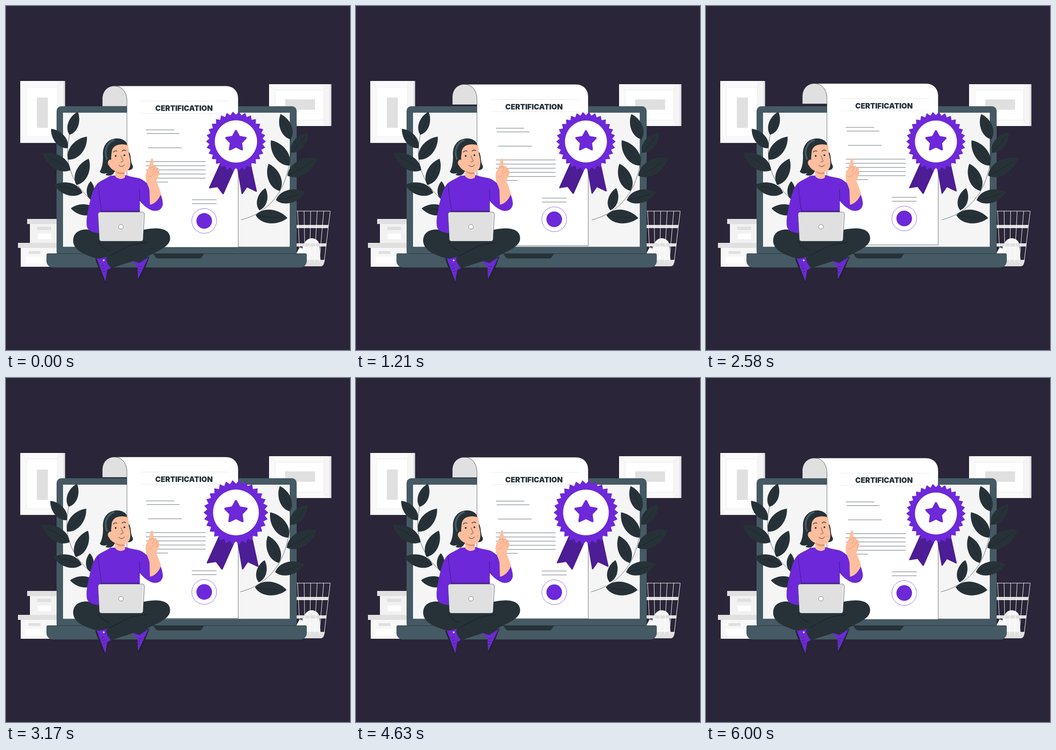
An HTML page with a canvas that plays this animation: 748 px wide and 748 px high, repeating every 6040 ms.

```html
<!DOCTYPE html>
<html lang="en">
<head>
<meta charset="utf-8">
<title>Certification</title>
<style>
html, body { margin: 0; width: 100%; height: 100%; overflow: hidden; background: #2a2538; }
canvas { display: block; width: 748px; height: 748px; }
</style>
</head>
<body>
<canvas id="stage"></canvas>
<script>
const SIZE = 748, LOOP = 6040, BEAT = 1503, LEAD = 12;
const INK = '#263238', STEEL = '#455a64', PURPLE = '#6d28d9', DEEP = '#4c1d95';
const SKIN = '#ffbe9d', GREY = '#e0e0e0', PALE = '#f5f5f5', WHITE = '#ffffff';

const canvas = document.getElementById('stage');
const ctx = canvas.getContext('2d');
const ratio = window.devicePixelRatio || 1;
canvas.width = canvas.height = Math.round(SIZE * ratio);

function fill(d, color) {
  ctx.fillStyle = color;
  ctx.fill(new Path2D(d));
}
function line(d, color = INK, width = 0.7) {
  ctx.strokeStyle = color;
  ctx.lineWidth = width;
  ctx.stroke(new Path2D(d));
}
function rect(x, y, r, b, color) {
  ctx.fillStyle = color;
  ctx.fillRect(x, y, r - x, b - y);
}
function round(x, y, r, b, radii, color) {
  ctx.beginPath();
  ctx.roundRect(x, y, r - x, b - y, radii);
  ctx.fillStyle = color;
  ctx.fill();
}
function disc(x, y, r, color) {
  ctx.beginPath();
  ctx.arc(x, y, r, 0, Math.PI * 2);
  ctx.fillStyle = color;
  ctx.fill();
}
function ring(x, y, r, color, width) {
  ctx.beginPath();
  ctx.arc(x, y, r, 0, Math.PI * 2);
  ctx.strokeStyle = color;
  ctx.lineWidth = width;
  ctx.stroke();
}
function spikes(x, y, n, outer, inner, turn = 0) {
  ctx.beginPath();
  for (let i = 0; i < n * 2; i++) {
    const a = (i + turn) * Math.PI / n - Math.PI / 2, r = i % 2 ? inner : outer;
    ctx.lineTo(x + r * Math.cos(a), y + r * Math.sin(a));
  }
  ctx.closePath();
}

// Piecewise linear value from [position, value] stops, position 0..1
function track(stops, p) {
  for (let i = 1; i < stops.length; i++) {
    const [a, u] = stops[i - 1], [b, v] = stops[i];
    if (p <= b) return u + (v - u) * (p - a) / (b - a);
  }
  return stops[stops.length - 1][1];
}
const FLOAT = [[0, 0], [0.5, -10], [1, 0]];
const PULSE = [[0, 1], [0.1, 1.1], [0.3, 1], [0.4, 1], [0.5, 1.1], [0.6, 1], [1, 1]];
const SHAKE = [0, -1, 2, -4, 4, -4, 4, -4, 2, -1, 0].map((v, i) => [i / 10, v]);

function wallFrame(x, y, r, b, inset, side, inner) {
  const f = r - side, [l, t, ri, bo] = [x + inset, y + inset, f - inset, b - inset];
  rect(x, y, r, b, GREY);
  rect(x, y, f, b, '#fafafa');
  rect(ri, y, f, b, PALE);
  rect(l, t, ri, bo, WHITE);
  line(`M${l} ${t}H${ri}V${bo}H${l}ZM${x} ${y}L${l} ${t}M${f} ${y}L${ri} ${t}M${f} ${b}L${ri} ${bo}M${x} ${b}L${l} ${bo}`, '#e6e6e6', 0.8);
  rect(...inner, GREY);
}

function boxes() {
  rect(52, 473, 114, 516, '#f2f2f2');
  rect(46, 463, 114, 474, GREY);
  rect(68, 480, 98, 487, GREY);
  rect(69, 495, 98, 507, WHITE);
  rect(32, 525, 114, 567, '#f7f7f7');
  rect(26, 515, 114, 526, GREY);
  rect(49, 533, 75, 539, GREY);
  rect(43, 545, 84, 560, WHITE);
}

function basket() {
  fill('M642 553C642 530 645 519 652 511C660 502 672 504 679 512C684 522 682 538 684 553Z', PALE);
  fill('M632 537C637 526 640 523 643 526L650 553H632Z', WHITE);
  fill('M628 476H701L700 483H628Z', GREY);
  fill('M628 516H697L696 523H628Z', GREY);
  fill('M628 552H693L691 561Q689 566 684 566H628Z', GREY);
  const middle = 655;
  let wires = 'M625 446H705';
  for (let x = 634; x < 710; x += 14.2) wires += `M${x} 446L${middle + (x - middle) * 0.73} 558`;
  line(wires, WHITE, 1);
}

function laptop() {
  round(110, 218, 632, 545, 10, STEEL);
  rect(124, 232, 617, 523.5, PALE);
  round(88, 538, 654, 568.5, [3, 3, 14, 14], STEEL);
  line('M90 538.5H652', INK, 0.8);
  fill('M320 538H431L425 547Q424 549 421 549H331Q328 549 326 547Z', INK);
}

function paper(dy) {
  ctx.save();
  ctx.translate(0, dy);
  fill('M209.5 218V202C209.5 186 220 174 236 174C252 174 263 188 263 206V218Z', GREY);
  line('M209.5 218V202C209.5 186 220 174 236 174');
  const sheet = 'M236 174H478C494 174 505 185 505 201V525H263V206C263 188 252 174 236 174Z';
  fill(sheet, WHITE);
  line(sheet);
  line('M292 207H486M292 233.5H486', '#e3e4e6', 0.8);
  ctx.fillStyle = INK;
  ctx.font = '900 16px Inter, "Open Sans", sans-serif';
  ctx.textAlign = 'center';
  ctx.fillText('CERTIFICATION', 387, 228.3);
  let rows = 'M304 269.5H366M306 277.5H377M309 308.5H382M323 383H352M404 421.5H458M404 430H458';
  for (let i = 0; i < 5; i++) rows += `M304 ${338.5 + i * 9}H434`;
  line(rows, INK, 0.7);
  disc(431, 467.5, 17, PURPLE);
  ring(431, 467.5, 27, PURPLE, 0.7);
  ctx.restore();
}

// Each leaf: base x, y, tip x, y
const LEFT = [
  [138, 280, 156, 230], [134, 309, 98, 267], [135, 334, 176, 284], [140, 357, 80, 320],
  [153, 389, 180, 332], [166, 406, 105, 389], [184, 421, 184, 381], [197, 446, 141, 440]
];
const RIGHT = [
  [619, 290, 597, 235], [620, 319, 657, 275], [616, 347, 576, 292], [612, 369, 677, 331],
  [595, 402, 571, 343], [587, 422, 651, 405], [551, 444, 564, 396], [543, 455, 612, 461]
];
function leaf([x, y, u, v]) {
  const dx = u - x, dy = v - y;
  const at = (k, n) => `${x + dx * k - dy * n} ${y + dy * k + dx * n}`;
  fill(`M${x} ${y}C${at(0.2, 0.29)} ${at(0.7, 0.28)} ${u} ${v}C${at(0.7, -0.28)} ${at(0.2, -0.29)} ${x} ${y}Z`, INK);
  line(`M${x} ${y}Q${at(0.45, 0.05)} ${at(0.8, 0)}`, '#151d21', 0.6);
}
function laurels(dx) {
  ctx.save();
  ctx.translate(dx, 0);
  line('M138 280C133 305 131 335 141 360C151 388 168 408 198 432');
  line('M619 290C622 315 618 348 606 380C592 418 562 452 511 465');
  LEFT.forEach(leaf);
  RIGHT.forEach(leaf);
  ctx.restore();
}

function medal(scale) {
  ctx.save();
  ctx.translate(500, 320);
  ctx.scale(scale, scale);
  ctx.translate(-500, -320);
  fill('M466 341L442 394Q441 397 444 396L460 393.5L471 408Q473 410 474 407L497 355Z', DEEP);
  fill('M503 355L512 407Q513 410 515 407L524 394L543 403Q546 404 545 401L532 341Z', DEEP);
  spikes(500, 294.7, 30, 64.6, 57.5, 1);
  ctx.fillStyle = PURPLE;
  ctx.fill();
  disc(500, 294.7, 45.6, WHITE);
  spikes(500, 294, 5, 22, 11.5);
  ctx.fillStyle = ctx.strokeStyle = PURPLE;
  ctx.lineWidth = 4.5;
  ctx.fill();
  ctx.stroke();
  ctx.restore();
}

function shoes() {
  fill('M194 550L199 547L217 598L215 602L208 588Z', '#1d272c');
  fill('M197 549L216 541L228 570L220 574L216 599Z', PURPLE);
  line('M207 566L213 563M209 572L215 569M211 578L216 576', INK, 1);
  disc(212.5, 553, 2, '#d9c8f5');
  fill('M312 545L306 545L286 594L288 599L293 594Z', '#1d272c');
  fill('M275 556L300 544L310 546L287 594L286 567Z', PURPLE);
  line('M288 566L295 567M288 572L293 573M287 578L291 579', INK, 1);
  line('M289 550L301 545', WHITE, 1);
}

function legs() {
  fill('M178 486C155 485 146 496 146 511C147 531 170 541 197 549C206 551 222 544 234 540L290 559L310 546L260 510Z', INK);
  fill('M290 489C310 483 334 481 347 488C358 494 359 508 354 515C347 526 327 535 306 545L229 570C223 566 217 554 218 548L250 528L222 508Z', INK);
  line('M218 547L262 524C276 517 292 517 306 514M200 511C204 520 214 528 224 532', '#10181c', 0.8);
}

function torso() {
  fill('M227 369C219 375 209 378 201 384C191 392 186 410 181 432C176 454 174 468 176 480C178 489 190 493 203 494L204 449H291V424C298 433 307 440 316 444C328 448 339 444 341 431C341 421 337 411 335 407C329 400 309 387 297 378C288 372 273 373 262 368Z', PURPLE);
  fill('M207 445H291V449.5H205Z', DEEP);
  line('M200 387L205 428L208 447M291 424L290 398', '#2b1456', 0.7);
}

function hand() {
  fill('M313 432L312 402C311 392 305 386 304 376C302 366 306 358 310 352L315 334C316 330 320 331 320 335L321 349C325 346 328 349 328 352C332 351 333 355 332 359C335 362 332 368 330 373L327 381C331 391 335 400 337 408C333 421 322 431 313 432Z', SKIN);
  line('M310 353C314 351 318 350 321 349M321 349C323 354 320 359 317 360M328 352C329 357 326 362 323 363M332 359C331 364 328 367 326 367M309 371C314 372 319 369 320 363', '#d98a68', 0.7);
}

function head() {
  fill('M211 326C209 304 221 289 240 288C253 287 262 294 265 303L266 316C273 322 270 338 275 346C279 354 270 359 262 356L236 360C233 368 225 371 216 367L221 363C213 366 206 364 204 360C210 350 211 338 211 326Z', INK);
  fill('M236 350L238 371C245 378 255 377 259 372L257 356Z', SKIN);
  fill('M238 357C244 362 251 363 258 361L258 365C250 367 243 365 238 360Z', '#e5936f');
  fill('M231 306C240 299 253 298 264 300C266 306 268 314 267 321C270 331 272 343 269 351C265 360 256 363 247 361C237 360 228 355 224 347C219 342 222 333 228 334Z', SKIN);
  fill('M229 334C226 322 230 309 238 304C247 300 257 300 264 303C258 289 240 286 227 295L219 332Z', INK);
  line('M220 334C213 319 216 298 236 291', STEEL, 4);
  disc(238.5, 326, 1.9, INK);
  disc(257.5, 324.5, 1.9, INK);
  line('M233 318Q237 313 242 316M252 316Q256 311 261 315', INK, 1.3);
  line('M250 325Q253 333 255 337Q252 340 249 339', INK, 0.8);
  line('M245 346Q252 353 258 345', INK, 1);
  line('M263 346Q266 345 266 341', '#d98a68', 0.7);
}

function notebook() {
  const shell = 'M204 448L297 448Q301 449 301 453L298 508Q297 511.5 293 511.5H208Q204 511.5 203 508L200 453Q200 449 204 448Z';
  fill(shell, GREY);
  line(shell, '#37474f', 0.7);
  line('M298.5 452L295 509', PALE, 1.2);
  disc(250, 480, 5, WHITE);
  ring(250, 480, 5, INK, 0.6);
}

function draw(now) {
  const t = (now % LOOP) + LEAD;
  const beat = (t / BEAT) % 1, sway = (t / (BEAT * 4)) % 1;
  ctx.setTransform(ratio, 0, 0, ratio, 0, 0);
  ctx.lineJoin = 'round';
  ctx.lineCap = 'butt';
  rect(0, 0, SIZE, SIZE, '#2a2538');
  wallFrame(31, 163, 128.5, 297.5, 13, 4, [67, 199, 91, 265]);
  wallFrame(572, 170, 707.5, 261, 13, 4, [607, 203, 672, 225.5]);
  boxes();
  basket();
  laptop();
  paper(track(FLOAT, beat));
  laurels(track(SHAKE, sway));
  medal(track(PULSE, beat));
  shoes();
  legs();
  torso();
  hand();
  head();
  notebook();
}

let start;
function tick(now) {
  if (start === undefined) start = now;
  draw(now - start);
  requestAnimationFrame(tick);
}
draw(0);
requestAnimationFrame(tick);
</script>
</body>
</html>
```
